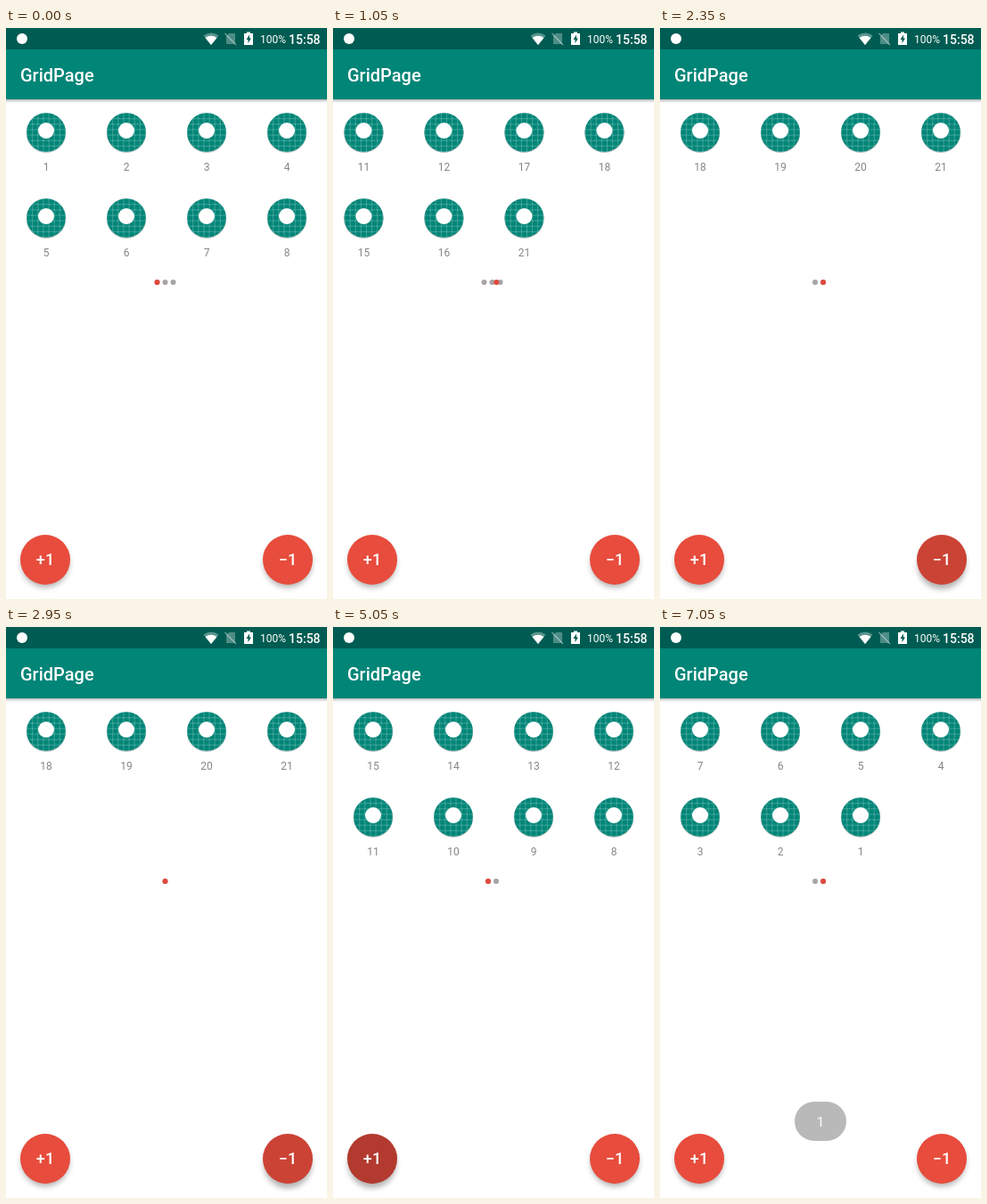
Write an HTML page that moves like this. It is 360 by 640 pixels and loops after 7100 ms.

```html
<!DOCTYPE html>
<html lang="en">
<head>
<meta charset="utf-8">
<title>GridPage</title>
<style>
html, body { margin: 0; width: 100%; height: 100%; overflow: hidden; background: #fff; }
svg { display: block; width: 360px; height: 640px; font-family: Roboto, "Liberation Sans", sans-serif; }
.label { font-size: 12px; fill: #858585; text-anchor: middle; }
.fab { font-size: 18px; font-weight: 500; fill: #fff; text-anchor: middle; }
</style>
</head>
<body>
<svg id="stage" viewBox="0 0 360 640">
  <defs>
    <linearGradient id="barShadow" x2="0" y2="1">
      <stop stop-color="#000" stop-opacity=".26"/>
      <stop offset="1" stop-color="#000" stop-opacity="0"/>
    </linearGradient>
    <filter id="blur" x="-30%" y="-30%" width="160%" height="160%"><feGaussianBlur stdDeviation="3"/></filter>
    <clipPath id="disc"><circle r="22"/></clipPath>
    <g id="icon">
      <circle cy=".8" r="22.2" fill="#000" opacity=".22"/>
      <circle r="22" fill="#008577"/>
      <path id="grid" clip-path="url(#disc)" stroke="#fff" stroke-opacity=".3" stroke-width=".8"/>
      <circle cy="-2" r="9" fill="#fff"/>
    </g>
  </defs>
  <rect width="360" height="640" fill="#fff"/>
  <rect id="highlight" x="180" y="176" width="90" height="96" fill="#ece2ee"/>
  <g id="cells"></g>
  <g id="dots"></g>

  <rect y="80" width="360" height="4" fill="url(#barShadow)"/>
  <rect y="24" width="360" height="56" fill="#008577"/>
  <rect width="360" height="24" fill="#005c52"/>
  <text x="16" y="60" font-size="20" font-weight="500" fill="#fff">GridPage</text>
  <g fill="#fff">
    <circle cx="18" cy="12" r="6"/>
    <path d="M221.5 8.5Q230 2.5 238.5 8.5L230 19Z" opacity=".35"/>
    <path d="M223.500 11Q230 6.500 236.500 11L230 19Z"/>
    <path d="M250 6H257V18H247V9Z" opacity=".3"/>
    <path d="M245.500 6L258 19" stroke="#fff" stroke-width="1.2" opacity=".45"/>
    <path d="M267 6H270V4.500H274V6H277V19H267Z"/>
    <path d="M273 7.500L269.500 13H271.500V17L275 11.500H273Z" fill="#005c52"/>
    <text x="285" y="17" font-size="12">100%</text>
    <text x="317" y="17.5" font-size="14" font-weight="500">15:58</text>
  </g>
  <g id="fabs"></g>
  <g id="toast">
    <rect x="151" y="532" width="58" height="44" rx="22" fill="#909090"/>
    <text x="180" y="560" font-size="15" fill="#fff" text-anchor="middle">1</text>
  </g>
</svg>
<script>
const LOOP = 7100, TOTAL = 21, PER_PAGE = 8;
const REMOVE = { start: 1650, step: 80, max: TOTAL };
const ADD = { start: 3820, step: 85, max: 15 };

const byId = id => document.getElementById(id);
function make(parent, tag, attrs = {}) {
  const node = document.createElementNS("http://www.w3.org/2000/svg", tag);
  for (const key in attrs) node.setAttribute(key, attrs[key]);
  return parent.appendChild(node);
}
const ramp = (t, from, to) => Math.max(0, Math.min(1, (t - from) / (to - from)));
const swipe = (t, from) => 1 - (1 - ramp(t, from, from + 481)) ** 2;
const pulse = (t, on, off, fadeIn, fadeOut) =>
  ramp(t, on, on + fadeIn) * (1 - ramp(t, off, off + fadeOut));
const taps = (t, { start, step, max }) =>
  t < start ? 0 : Math.min(max, 1 + Math.floor((t - start) / step));

let gridPath = "";
for (let k = -3.5; k < 4; k++) {
  const p = (k * 6.11).toFixed(2);
  gridPath += `M${p} -22V22M-22 ${p}H22`;
}
byId("grid").setAttribute("d", gridPath);

const cells = Array.from({ length: 2 * PER_PAGE }, () => {
  const group = make(byId("cells"), "g");
  make(group, "use", { href: "#icon", x: 45, y: 37 });
  return { group, label: make(group, "text", { class: "label", x: 45, y: 80 }) };
});

const dots = Array.from({ length: 3 }, () => make(byId("dots"), "circle", { cy: 285, r: 3, fill: "#a8a3a8" }));
const activeDot = make(byId("dots"), "circle", { cy: 285, r: 3, fill: "#e0493c" });

function makeFab(x, text) {
  const group = make(byId("fabs"), "g", { transform: `translate(${x} 596)` });
  const shadow = make(group, "circle", { r: 27, filter: "url(#blur)" });
  make(group, "circle", { r: 28, fill: "#e74c3c" });
  const shade = make(group, "circle", { r: 28 });
  make(group, "text", { class: "fab", y: 6 }).textContent = text;
  return (press, strength) => {
    shade.setAttribute("opacity", press * strength);
    shadow.setAttribute("cy", 4 + 2 * press);
    shadow.setAttribute("opacity", .3);
  };
}
const pressPlus = makeFab(44, "+1");
const pressMinus = makeFab(316, "\u22121");

function listAt(t) {
  if (t >= ADD.start) {
    const count = taps(t, ADD);
    return { count, value: i => count - i, page: swipe(t, 5250) };
  }
  const removed = taps(t, REMOVE), count = TOTAL - removed;
  const page = removed ? Math.max(0, Math.ceil(count / PER_PAGE) - 1) : swipe(t, 300) + swipe(t, 900);
  return { count, value: i => removed + 1 + i, page };
}

function render(t) {
  const { count, value, page } = listAt(t);
  const first = Math.floor(page) * PER_PAGE;
  cells.forEach(({ group, label }, k) => {
    const i = first + k, slot = i % PER_PAGE;
    group.style.display = i < count ? "" : "none";
    if (i >= count) return;
    const x = (Math.floor(i / PER_PAGE) - page) * 360 + slot % 4 * 90;
    group.setAttribute("transform", `translate(${x} ${80 + Math.floor(slot / 4) * 96})`);
    label.textContent = value(i);
  });

  const pages = Math.ceil(count / PER_PAGE);
  const dotX = p => 178.5 + (p - (pages - 1) / 2) * 9;
  dots.forEach((dot, p) => {
    dot.style.display = p < pages ? "" : "none";
    dot.setAttribute("cx", dotX(p));
  });
  activeDot.style.display = pages ? "" : "none";
  activeDot.setAttribute("cx", dotX(page));

  pressMinus(pulse(t, 1600, 3280, 80, 150), .12);
  pressPlus(pulse(t, 3780, 5040, 80, 150), .25);
  byId("highlight").setAttribute("opacity", pulse(t, 5850, 6020, 80, 180));
  byId("toast").setAttribute("opacity", pulse(t, 5890, 6900, 140, 400));
}

const begin = performance.now();
function tick() {
  render((performance.now() - begin) % LOOP);
  requestAnimationFrame(tick);
}
render(0);
requestAnimationFrame(tick);
</script>
</body>
</html>
```
